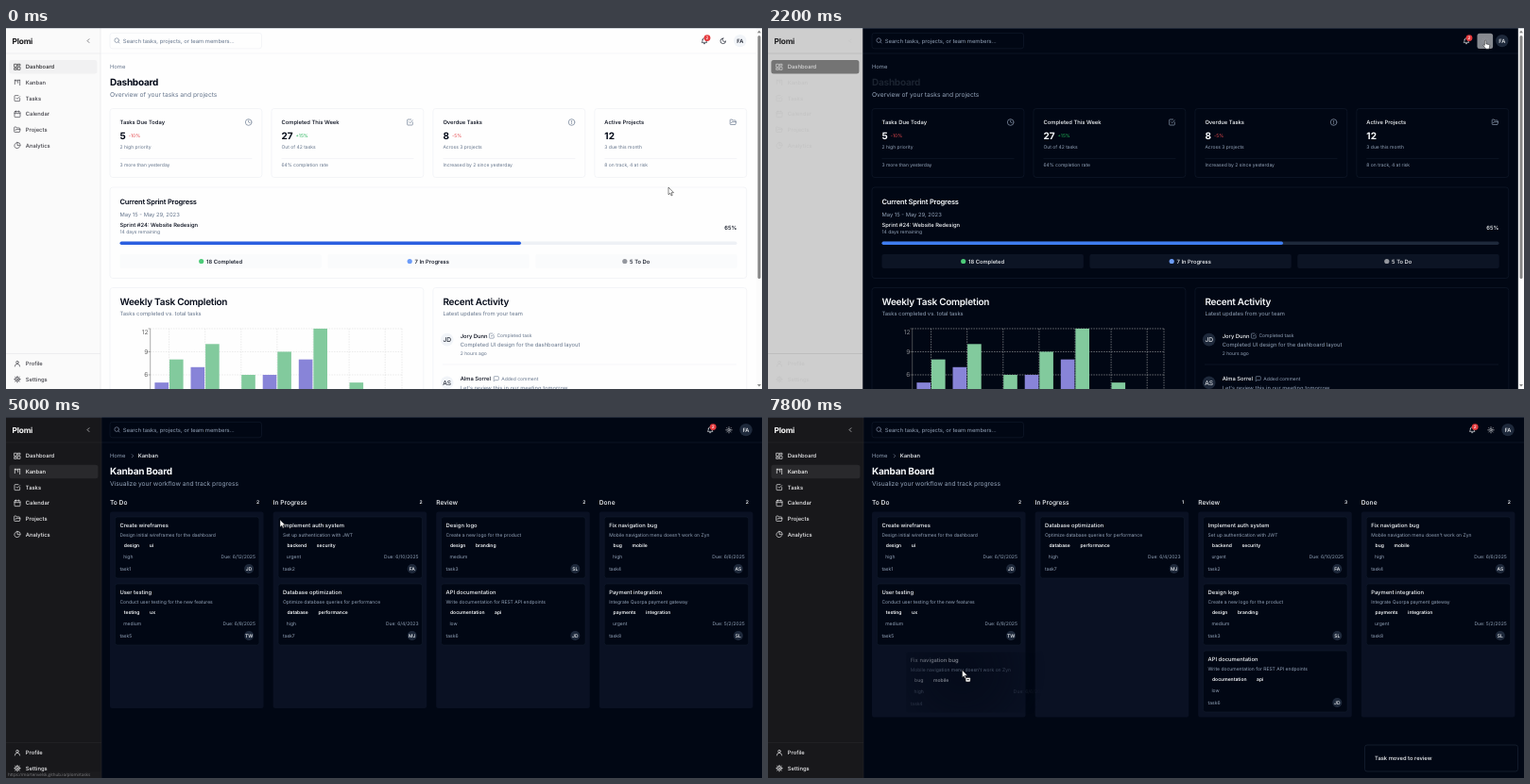
These frames come from a looping animation (800 by 383 pixels, 8000 ms). An HTML page:

```html
<!DOCTYPE html>
<html lang="en">
<head>
<meta charset="utf-8">
<title>Task dashboard</title>
<style>
  html, body { margin: 0; width: 100%; height: 100%; overflow: hidden; background: #020817; }
  svg { display: block; width: 100vw; height: 100vh; font-family: Inter, sans-serif; text-rendering: geometricPrecision; }
</style>
</head>
<body>
<svg id="stage" viewBox="0 0 800 383" preserveAspectRatio="none"></svg>
<script>
const LOOP = 8000, STEP = 200;
const XS = 5, SM = 5.83, MD = 6.67, LG = 7.5, XL = 10;
const stage = document.getElementById('stage');
const ruler = document.createElement('canvas').getContext('2d');

const light = {
  bg: '#fefefe', fg: '#020817', title: '#020817', muted: '#64748b', border: '#eceff3', primary: '#2b5fe0',
  track: '#eef1f5', box: '#fafbfc', chip: '#f1f4f8', grid: '#dcdcdc', side: '#fafafa', sideText: '#3f3f46',
  logo: '#18181b', active: '#f1f1f2', activeText: '#27272a', hover: '#f1f5f9', sideLine: '#e4e4e7'
};
const dark = {
  bg: '#010714', fg: '#f8fafc', title: '#f8fafc', muted: '#94a3b8', border: '#141d2e', primary: '#3f7df0',
  track: '#1e293b', box: '#0c1424', chip: '#1e293b', grid: '#b8b8b8', side: '#18181b', sideText: '#f0f0f2',
  logo: '#fafafa', active: '#29292c', activeText: '#fafafa', hover: '#1e293b', sideLine: '#27272a'
};
// Sidebar, heading and toggle lag behind the rest when the theme flips
const flipping = {
  ...dark, title: '#1b2330', side: '#cecece', sideText: '#c4c4c4', logo: '#202022', active: '#747474',
  activeText: '#d8d8d8', hover: '#878a90', sideLine: '#b2b2b4'
};
let theme = light;

const icons = {
  dash: 'M3 3h7v9H3zM14 3h7v5h-7zM14 12h7v9h-7zM3 16h7v5H3z',
  kanban: 'M4 4v13M9 4v4M14 4v9M20 4v16M4 4h5M14 4h6',
  check: 'M9 11l3 3 8-8M20 12v7a2 2 0 0 1-2 2H5a2 2 0 0 1-2-2V5a2 2 0 0 1 2-2h10',
  calendar: 'M8 2v4M16 2v4M3 10h18M5 4h14a2 2 0 0 1 2 2v14a2 2 0 0 1-2 2H5a2 2 0 0 1-2-2V6a2 2 0 0 1 2-2z',
  folder: 'M6 14l1.5-3h14L19 19.5H4a2 2 0 0 1-2-2V5a2 2 0 0 1 2-2h4l2 3h8a2 2 0 0 1 2 2v3',
  pie: 'M20 15A9 9 0 1 1 9 3.5M12 2v10h10A10 10 0 0 0 12 2z',
  user: 'M20 21a8 8 0 0 0-16 0M16 8a4 4 0 1 1-8 0 4 4 0 0 1 8 0',
  gear: 'M19 12a7 7 0 1 1-14 0 7 7 0 0 1 14 0M15 12a3 3 0 1 1-6 0 3 3 0 0 1 6 0M12 2v3M12 19v3M2 12h3M19 12h3M5 5l2 2M17 17l2 2M5 19l2-2M17 7l2-2',
  clock: 'M22 12a10 10 0 1 1-20 0 10 10 0 0 1 20 0M12 6v6l4 2',
  alert: 'M22 12a10 10 0 1 1-20 0 10 10 0 0 1 20 0M12 7v6M12 16v1',
  bell: 'M6 8a6 6 0 0 1 12 0c0 7 3 9 3 9H3s3-2 3-9M10 21h4',
  moon: 'M12 3a6 6 0 0 0 9 9 9 9 0 1 1-9-9z',
  sun: 'M16 12a4 4 0 1 1-8 0 4 4 0 0 1 8 0M12 2v2M12 20v2M2 12h2M20 12h2M5 5l1.5 1.5M17.5 17.5L19 19M5 19l1.5-1.5M17.5 6.5L19 5',
  search: 'M19 11a8 8 0 1 1-16 0 8 8 0 0 1 16 0M21 21l-4.3-4.3',
  left: 'M15 18l-6-6 6-6', right: 'M9 18l6-6-6-6',
  message: 'M21 15a2 2 0 0 1-2 2H7l-4 4V5a2 2 0 0 1 2-2h14a2 2 0 0 1 2 2z'
};

const text = (x, y, s, size, fill, weight = 400, anchor = 'start', extra = '') =>
  `<text x="${x}" y="${y}" font-size="${size}" fill="${fill}" font-weight="${weight}" text-anchor="${anchor}" ${extra}>${s}</text>`;
const heading = (x, y, s, size, fill = theme.fg, weight = 600) =>
  text(x, y, s, size, fill, weight, 'start', `letter-spacing="${-0.025 * size}"`);
const rect = (x, y, w, h, fill, r = 0, stroke = 'none') =>
  `<rect x="${x}" y="${y}" width="${w}" height="${h}" rx="${r}" fill="${fill}" stroke="${stroke}" stroke-width=".6"/>`;
const circle = (x, y, r, fill) => `<circle cx="${x}" cy="${y}" r="${r}" fill="${fill}"/>`;
const line = (x1, y1, x2, y2, color, extra = '') =>
  `<path d="M${x1} ${y1}L${x2} ${y2}" stroke="${color}" stroke-width=".6" ${extra}/>`;
const icon = (name, x, y, size = 8.3, color = theme.muted) =>
  `<path transform="translate(${x - size / 2} ${y - size / 2}) scale(${size / 24})" d="${icons[name]}" fill="none" stroke="${color}" stroke-width="2" stroke-linecap="round" stroke-linejoin="round"/>`;
const panel = (x, y, w, h) => rect(x, y, w, h, theme.bg, 3, theme.border);
const avatar = (x, y, r, s, size, weight) =>
  circle(x, y, r, theme.chip) + text(x, y + size * .36, s, size, theme.fg, weight, 'middle');
const textWidth = (s, size, weight) => {
  ruler.font = `${weight} ${size * 20}px Inter, sans-serif`;
  return ruler.measureText(s).width / 20;
};

const menu = [['dash', 'Dashboard'], ['kanban', 'Kanban'], ['check', 'Tasks'],
  ['calendar', 'Calendar'], ['folder', 'Projects'], ['pie', 'Analytics']];

function sidebar(width, active, hovered) {
  let out = rect(0, 0, width, 383, theme.side) + line(width, 0, width, 383, theme.sideLine) +
    heading(6.6, 16.6, 'Plomi', 8.33, theme.logo, 700) + icon('left', 87, 13.6, 7.5, theme.sideText) +
    line(0, 27, width, 27, theme.sideLine) + line(0, 345.5, width, 345.5, theme.sideLine);
  menu.forEach(([name, label], i) => {
    const y = 41.3 + i * 16.67, color = i === active ? theme.activeText : theme.sideText;
    if (i === active || i === hovered)
      out += `<g opacity="${i === active ? 1 : .55}">${rect(3.4, y - 7.3, width - 7, 14.6, theme.active, 2.5)}</g>`;
    out += icon(name, 12, y, 8, color) + text(20.8, y + 2.1, label, SM, color, 500);
  });
  return out + icon('user', 12, 356, 8, theme.sideText) + text(20.8, 358.2, 'Profile', SM, theme.sideText, 500) +
    icon('gear', 12, 372.7, 8, theme.sideText) + text(20.8, 374.9, 'Settings', SM, theme.sideText, 500);
}

function header(dx, toggleHovered) {
  return line(100, 27, 800, 27, theme.border) +
    rect(110, 5.4, 160.5, 16.4, 'none', 2.5, theme.border) + icon('search', 117.5, 13.4, 7, theme.muted) +
    text(123.8, 15.7, 'Search tasks, projects, or team members...', SM, theme.muted) +
    (toggleHovered ? rect(750.5, 5.7, 16.6, 16.4, theme.hover, 2.5) : '') +
    icon('bell', 739 + dx, 13.8, 7.5, theme.fg) + circle(742 + dx, 10.6, 3.4, '#e5393c') +
    text(742 + dx, 12.2, '2', 4.6, '#fff', 500, 'middle') +
    icon(theme === light ? 'moon' : 'sun', 758.8 + dx, 13.8, 7.5, theme === flipping ? '#9a9ca0' : theme.fg) +
    avatar(776.8 + dx, 13.6, 6.7, 'FA', SM, 500);
}

const stats = [
  ['Tasks Due Today', '5', '-10%', '2 high priority', '3 more than yesterday', 'clock'],
  ['Completed This Week', '27', '+15%', 'Out of 42 tasks', '64% completion rate', 'check'],
  ['Overdue Tasks', '8', '-5%', 'Across 3 projects', 'Increased by 2 since yesterday', 'alert'],
  ['Active Projects', '12', '', '3 due this month', '8 on track, 4 at risk', 'folder']
];

function statCards() {
  return stats.map(([label, value, trend, note, foot, name], i) => {
    const x = 110 + i * 170.95, tx = x + 10.5;
    const trendX = tx + textWidth(value, XL, 700) + 3;
    return panel(x, 85.5, 160.9, 73) + text(tx, 102.3, label, SM, theme.fg, 500) + icon(name, x + 146.7, 100, 8) +
      text(tx, 117.8, value, XL, theme.fg, 700) +
      text(trendX, 115.8, trend, XS, trend[0] === '+' ? '#22b357' : '#e5484d') +
      text(tx, 128, note, XS, theme.muted) + line(tx, 138.6, x + 150.5, 138.6, theme.border) +
      text(tx, 146.6, foot, XS, theme.muted);
  }).join('');
}

function sprint() {
  const counts = [['18 Completed', '#4ccb78', 206.7], ['7 In Progress', '#6c9cf8', 427.2], ['5 To Do', '#94979e', 654.8]];
  return panel(110, 169, 673.75, 96.5) + heading(120.5, 187.3, 'Current Sprint Progress', LG) +
    text(120.5, 199.6, 'May 15 - May 29, 2023', SM, theme.muted) +
    text(120.5, 211.3, 'Sprint #24: Website Redesign', SM, theme.fg, 500) +
    text(120.5, 218.4, '14 days remaining', XS, theme.muted) +
    text(773.3, 214.4, '65%', SM, theme.fg, 500, 'end') +
    rect(120.5, 226.5, 653, 3.4, theme.track, 1.7) + rect(120.5, 226.5, 424.5, 3.4, theme.primary, 1.7) +
    counts.map(([label, color, x], i) => rect(120.5 + i * 219.9, 240, 213.4, 15, theme.box, 2) +
      circle(x, 247.5, 2.6, color) + text(x + 5.3, 249.6, label, SM, theme.fg, 500)).join('');
}

function chart() {
  const week = [[5, 8], [7, 10], [4, 6], [6, 9], [8, 12], [3, 5]];
  const yOf = v => 417 - v * 8.17, dash = 'stroke-dasharray="1.4 1.3"';
  let out = panel(110, 275.5, 331.9, 140) + heading(120.5, 294.3, 'Weekly Task Completion', XL) +
    text(120.5, 304.9, 'Tasks completed vs. total tasks', SM, theme.muted);
  for (const v of [6, 9, 12])
    out += line(152.7, yOf(v), 419, yOf(v), theme.grid, dash) + line(150.5, yOf(v), 152.7, yOf(v), '#777') +
      text(150.5, yOf(v) + (v === 12 ? 5.7 : 2.4), v, MD, theme === light ? '#666' : '#85878c', 400, 'end');
  for (let i = 0; i < 8; i++) {
    const x = Math.min(172.6 + i * 38.1, 419);
    out += line(x, yOf(12), x, 383, theme.grid, dash);
  }
  out += line(152.7, yOf(12), 152.7, 383, '#777');
  week.forEach((pair, i) => pair.forEach((v, j) => {
    out += rect(157.4 + i * 38.1 + j * 15.6, yOf(v), 14.6, v * 8.17, j ? '#82ca9d' : '#8884d8');
  }));
  return out;
}

function activity() {
  const row = (y, initials, name, iconName, iconX, action, note, when) =>
    avatar(466.7, y + 4, 6.8, initials, MD, 400) + text(480.7, y + 2, name, SM, theme.fg, 500) +
    icon(iconName, iconX, y, 6.8) + text(iconX + 5.4, y + 1.8, action, XS, theme.muted) +
    text(480.7, y + 11.6, note, SM, theme.muted) + text(480.7, y + 20.2, when, XS, theme.muted);
  return panel(451.9, 275.5, 331.9, 140) + heading(462.4, 294.3, 'Recent Activity', XL) +
    text(462.4, 304.9, 'Latest updates from your team', SM, theme.muted) +
    row(326.6, 'JD', 'Jory Dunn', 'check', 514, 'Completed task', 'Completed UI design for the dashboard layout', '2 hours ago') +
    line(462, 357, 773, 357, theme.border) +
    row(372.2, 'AS', 'Alma Sorrel', 'message', 518.8, 'Added comment', "Let's review this in our meeting tomorrow", '');
}

function scrollbar() {
  return rect(793.8, 0, 6.2, 383, '#fbfbfb') + rect(795.5, 8, 3, 258, '#868686', 1.5) +
    '<path d="M795 5.2h4l-2-2.6zM795 378h4l-2 2.6z" fill="#868686"/>';
}

const dashboard = () => text(110, 43.4, 'Home', SM, theme.muted) +
  heading(110, 61, 'Dashboard', XL, theme.title, 700) +
  text(110, 73, 'Overview of your tasks and projects', MD, theme.muted) +
  statCards() + sprint() + chart() + activity() + scrollbar();

const tasks = {
  1: ['Create wireframes', 'Design initial wireframes for the dashboard', 'design ui', 'high', '6/12/2025', 'JD'],
  2: ['Implement auth system', 'Set up authentication with JWT', 'backend security', 'urgent', '6/10/2025', 'FA'],
  3: ['Design logo', 'Create a new logo for the product', 'design branding', 'medium', '', 'SL'],
  4: ['Fix navigation bug', "Mobile navigation menu doesn't work on Zyn", 'bug mobile', 'high', '6/6/2025', 'AS'],
  5: ['User testing', 'Conduct user testing for the new features', 'testing ux', 'medium', '6/8/2025', 'TW'],
  6: ['API documentation', 'Write documentation for REST API endpoints', 'documentation api', 'low', '', 'JD'],
  7: ['Database optimization', 'Optimize database queries for performance', 'database performance', 'high', '6/4/2023', 'MJ'],
  8: ['Payment integration', 'Integrate Quorpa payment gateway', 'payments integration', 'urgent', '5/2/2025', 'SL']
};
const columns = ['To Do', 'In Progress', 'Review', 'Done'];
const columnX = i => 110 + i * 172.6;

function card(id, col, row) {
  const [title, note, tags, priority, due, who] = tasks[id];
  const x = columnX(col) + 10.4, y = 106 + row * 71;
  let tagX = x + 4.4;
  let out = rect(x - 5, y, 152.5, 65, theme.bg, 2.5, theme.border) + text(x, y + 11.3, title, SM, theme.fg, 500) +
    text(x, y + 20.9, note, XS, theme.muted);
  for (const tag of tags.split(' ')) {
    out += text(tagX, y + 31.8, tag, XS, theme.fg, 600);
    tagX += textWidth(tag, XS, 600) + 10.6;
  }
  return out + text(x + 3.8, y + 43.6, priority, XS, theme.muted) +
    (due && text(x + 143.5, y + 43.6, 'Due: ' + due, XS, theme.muted, 400, 'end')) +
    text(x, y + 56.8, 'task' + id, XS, theme.muted) + avatar(x + 136.7, y + 55, 5, who, XS, 500);
}

function kanban(moved) {
  const board = moved ? [[1, 5], [7], [2, 3, 6], [4, 8]] : [[1, 5], [2, 7], [3, 6], [4, 8]];
  return text(110, 43.4, 'Home', SM, theme.muted) + icon('right', 134, 41.3, 6.5, theme.muted) +
    text(139.7, 43.4, 'Kanban', SM, theme.fg, 500) + heading(110, 61, 'Kanban Board', XL, theme.fg, 700) +
    text(110, 73, 'Visualize your workflow and track progress', MD, theme.muted) +
    board.map((ids, col) => {
      const x = columnX(col);
      return text(x, 93.2, columns[col], MD, theme.fg, 500) +
        text(x + 156.5, 92.4, ids.length, XS, theme.fg, 600, 'middle') +
        rect(x, 100.5, 162.6, moved ? 218 : 208.5, '#0a1123', 2.5) + ids.map((id, row) => card(id, col, row)).join('');
    }).join('');
}

// Translucent copy of a card, fading out around the point where it is held
const ghost = (id, col, [gx, gy], [x, y]) =>
  `<defs><radialGradient id="fade" gradientUnits="userSpaceOnUse" cx="${gx}" cy="${gy}" r="88">
  <stop offset="0" stop-color="#fff"/><stop offset=".5" stop-color="#999"/><stop offset="1" stop-color="#000"/></radialGradient>
  <mask id="soft" maskUnits="userSpaceOnUse" x="0" y="0" width="800" height="383"><rect width="800" height="383" fill="url(#fade)"/></mask></defs>
  <g transform="translate(${x - gx} ${y - gy})" opacity=".6" mask="url(#soft)">${card(id, col, 0)}</g>`;

const toast = dy => rect(631.5, 348 + dy, 162, 28, theme.bg, 2.5, theme.track) +
  text(642, 364.4 + dy, 'Task moved to review', SM, theme.fg, 500);

const statusBar = (page, opacity) => `<g opacity="${opacity}">` + rect(0, 376.3, 101, 6.7, '#1f1f22', 1) +
  text(2, 381.4, 'https://mortenvelsk.github.io/plomi/' + page, 4.5, '#d6d6d8', 400, 'start', 'font-family="Open Sans, sans-serif"') + '</g>';

const grabFirst = [352, 125], grabSecond = [693, 125.5];
const path = [
  [0, 701, 169], [300, 701, 169], [1500, 757.5, 13], [2000, 756.5, 12.5], [2200, 757, 13], [2600, 757, 13],
  [4000, 30, 60], [4200, 30, 60], [4600, 31, 61], [4800, 150, 82], [5000, 290, 109], [5200, ...grabFirst],
  [5400, 385, 150], [6000, 562, 257], [6200, 562, 260], [6400, 562, 260], [7000, ...grabSecond],
  [7200, 682, 133], [7400, 540, 205], [7600, 320, 285], [7800, 205.5, 268.5], [8000, 205.5, 268.5]
];

function pointer(t) {
  const i = path.findIndex(p => p[0] > t);
  const [t0, x0, y0] = path[i - 1], [t1, x1, y1] = path[i];
  const u = (t - t0) / (t1 - t0), k = u * u * (3 - 2 * u);
  return [x0 + (x1 - x0) * k, y0 + (y1 - y0) * k];
}

const arrow = 'M0 0v7.8l1.8-1.6 1.2 2.7 1.2-.5-1.2-2.7h2.5z';
const hand = 'M1.4.8c0-1 1.5-1 1.5 0v3.1l2.8.6c.9.2 1.2.7 1 1.6L6.1 9.2H2.8L.1 5.9c-.4-.7.4-1.3 1-.8l.3.3z';
const cross = 'M0-5l1.5 1.8H.5V-.5h2.7v-1L5 0 3.2 1.5v-1H.5v2.7h1L0 5l-1.5-1.8h1V.5h-2.7v1L-5 0l1.8-1.5v1h2.7v-2.7h-1z';

function cursor([x, y], shape, dragging) {
  return `<g transform="translate(${x} ${y})" stroke="#111" stroke-width=".5" stroke-linejoin="round">
    <path d="${shape}" fill="#fff"/>${dragging ? '<rect x="3.6" y="8" width="5" height="4.4" rx=".8" fill="#fff"/><path d="M5 10.2h2.2" stroke-width="1"/>' : ''}</g>`;
}

function render(t) {
  const during = (from, to) => t >= from && t < to;
  const onBoard = t >= 4600, moved = t >= 6200, at = pointer(t);
  const firstDrag = during(5400, 6200), secondDrag = t >= 7200;
  const overToggle = during(1400, 2800), overMenu = during(4000, 4800), overCard = during(6200, 7200);
  theme = t < 2200 ? light : t < 2400 ? flipping : dark;

  let out = rect(0, 0, 800, 383, theme.bg) + header(onBoard ? 6.2 : 0, overToggle) +
    (onBoard ? kanban(moved) : dashboard()) +
    sidebar(onBoard ? 101 : 100, onBoard ? 1 : 0, overMenu ? 1 : -1) +
    rect(0, 0, 800, .8, 'rgba(100,116,139,.35)');
  if (t >= 6400) out += toast(t < 6600 ? 12 : 0);
  if (overMenu) out += statusBar('kanban', 1);
  else if (during(4800, 5200)) out += statusBar('tasks', t < 5000 ? 1 : .55);
  if (firstDrag) out += ghost(2, 1, grabFirst, at);
  if (secondDrag) out += ghost(4, 3, grabSecond, at);
  const shape = overToggle || overMenu ? hand : overCard ? cross : arrow;
  return out + cursor(at, shape, firstDrag || secondDrag);
}

let shown = -1;
function tick(now) {
  const t = Math.floor(now % LOOP / STEP) * STEP;
  if (t !== shown) stage.innerHTML = render(shown = t);
  requestAnimationFrame(tick);
}
tick(0);
</script>
</body>
</html>
```
